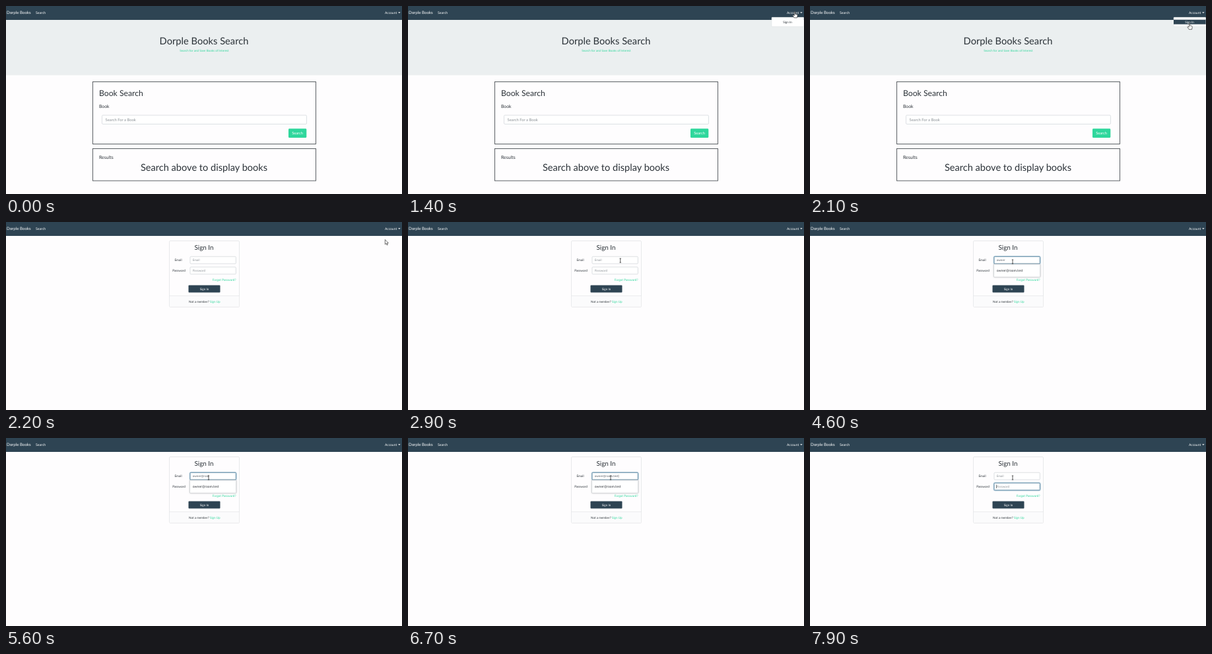
Recreate the animation shown at these times as an HTML page. Size 600 px wide and 284 px high, loop 8000 ms.

```html
<!DOCTYPE html>
<html lang="en">
<head>
<meta charset="utf-8">
<title>Book search sign-in</title>
<style>
  html, body { margin: 0; width: 100%; height: 100%; overflow: hidden; background: #fefdfe; }
  svg { display: block; width: 600px; height: 284px; font-family: Lato, sans-serif; text-rendering: geometricPrecision; }
</style>
</head>
<body>
<svg id="stage" viewBox="0 0 600 284"></svg>
<script>
const stage = document.getElementById('stage');
const LOOP = 8000, STEP = 100;
const NAVY = '#2e4453', GREEN = '#2fd79c', INK = '#2b3238', GREY = '#8b9196';
const BRAND = 'Dorple Books';
const LOGIN = 'owner@room.test';
const SAVED = ['oren.dasil@room.test', '456@456.test', 'owlnight@barn.test',
  'oren.dasil@cloud.test', '456@456', 'demo@room.test'];

// Times at which each key lands
const EMAIL_KEYS = [3600, 3700, 3800, 4000, 4100, 5000, 5400, 5500, 5600, 5800, 6000, 6100, 6300, 6400, 6600];
const PASSWORD_KEYS = [7300, 7400, 7500, 7600, 7700];
const OPEN_MENU = 1400, HOVER_ITEM = 1800, SIGN_IN = 2200;
const FOCUS_EMAIL = 3100, FOCUS_PASSWORD = 6900, SUBMIT = 7900;

const clamp = x => Math.max(0, Math.min(1, x));
const progress = (t, from, to) => clamp((t - from) / (to - from));
const ease = x => x * x * (3 - 2 * x);
const mix = (a, b, k) => a + (b - a) * k;

const rect = (x, y, w, h, fill, stroke = 'none', r = 0, extra = '') =>
  `<rect x="${x}" y="${y}" width="${w}" height="${h}" rx="${r}" fill="${fill}" stroke="${stroke}" ${extra}/>`;
const text = (s, x, y, size, fill = INK, anchor = 'start') =>
  `<text x="${x}" y="${y}" font-size="${size}" fill="${fill}" text-anchor="${anchor}">${s}</text>`;

function navbar() {
  return rect(0, 0, 600, 21, NAVY) +
    text(BRAND, 1, 12.1, 6.15, '#fff') +
    text('Search', 45, 11.9, 5.2, '#fff') +
    text('Account', 574, 11.9, 5, '#fff') +
    '<path d="M594.2 9.2h3.4l-1.7 1.8z" fill="#fff"/>';
}

function home() {
  const card = (y, h) => rect(131.5, y, 338, h, 'none', '#4b5054', 0, 'stroke-width=".9"');
  return rect(0, 21, 600, 83.5, '#ebeff0') +
    text(BRAND + ' Search', 300, 57.5, 14.7, INK, 'middle') +
    text('Search for and Save Books of Interest', 300.5, 68.7, 4.55, GREEN, 'middle') +
    card(114.5, 94) +
    text('Book Search', 141, 135.5, 12.2) +
    text('Book', 141, 153.7, 6.8) +
    rect(145.5, 165, 310, 13.4, '#fff', '#ced4d8', 1.4, 'stroke-width=".7"') +
    text('Search For a Book', 150.5, 173.7, 5.85, GREY) +
    rect(428, 185.3, 27.3, 13.8, GREEN, 'none', 1.4) +
    text('Search', 441.6, 194.2, 5.7, '#fff', 'middle') +
    card(215.5, 48.5) +
    text('Results', 141, 231, 6.9) +
    text('Search above to display books', 300, 249, 14.6, INK, 'middle');
}

function accountMenu(t) {
  if (t < OPEN_MENU) return '';
  const hover = t >= HOVER_ITEM;
  return rect(551, 17, 48.7, 14, '#fff', '#d5dadc', .8, 'stroke-width=".4"') +
    (hover ? rect(551, 20.7, 48.7, 6.9, NAVY) : '') +
    text('Sign In', 575, 25.8, 4.6, hover ? '#fff' : INK, 'middle');
}

function field(y, hint, value, focus, caret) {
  const glow = focus ? rect(278.6, y - .3, 70.2, 11.5, 'none', '#9dbdd0', 1.6, `stroke-width="2" opacity="${focus * .6}"`) : '';
  const box = rect(279, y, 69.4, 10.8, '#fff', focus ? '#4f7f9c' : '#ced3d7', 1.3, `stroke-width="${mix(.7, .9, focus)}"`);
  const cursor = caret ? `<tspan fill="#222" dx="-.3">|</tspan>` : '';
  const body = value
    ? text(value + cursor, 282.7, y + 6.9, 4.6, '#596068')
    : text(hint, 282.7, y + 6.9, 4.6, GREY) + (caret ? rect(282.4, y + 2.6, .6, 5.4, '#333') : '');
  return glow + box + body;
}

function suggestions(items) {
  const rowHeight = 13.7;
  return rect(278.4, 63.8, 70.4, 19.4 + (items.length - 1) * rowHeight, '#fff', '#c3c7ca', .8,
      'stroke-width=".7" style="filter:drop-shadow(0 .6px .8px #0003)"') +
    items.map((s, i) => text(s, 282.7, 75.1 + i * rowHeight, 5.1, '#30343a')).join('');
}

function signIn(t) {
  const typed = keys => keys.filter(k => k <= t).length;
  const submitted = t >= SUBMIT;
  const email = submitted ? '' : LOGIN.slice(0, typed(EMAIL_KEYS));
  const password = submitted ? '' : '•'.repeat(typed(PASSWORD_KEYS));
  const onPassword = t >= FOCUS_PASSWORD;
  const onEmail = t >= FOCUS_EMAIL && !onPassword;

  // The caret restarts its blink at every key and focus change
  const lastInput = Math.max(...[FOCUS_EMAIL, FOCUS_PASSWORD, SUBMIT, ...EMAIL_KEYS, ...PASSWORD_KEYS].filter(k => k <= t));
  const caret = t >= FOCUS_EMAIL && t - lastInput < 500;
  const emailFocus = onEmail ? progress(t, FOCUS_EMAIL - 100, FOCUS_EMAIL + 200) : 0;
  const passwordFocus = onPassword ? progress(t, FOCUS_PASSWORD - 100, FOCUS_PASSWORD + 200) : 0;

  return rect(247.5, 28.5, 106, 100, '#fefdfe', '#dfe0e3', 1.4, 'stroke-width=".7"') +
    rect(247.9, 111.2, 105.2, 16.9, '#fbfbfc') +
    rect(247.5, 111, 106, .6, '#e2e3e6') +
    text('Sign In', 300, 42.4, 9.9, INK, 'middle') +
    text('Email', 261, 59, 4.7, INK, 'middle') +
    text('Password', 262, 74.8, 4.7, INK, 'middle') +
    field(52.2, 'Email', email, emailFocus, onEmail && caret) +
    field(68, 'Password', password, passwordFocus, onPassword && caret) +
    text('Forgot Password?', 348.5, 88.8, 4.6, GREEN, 'end') +
    rect(276.5, 95.5, 48, 11, NAVY, 'none', 1) +
    text('Sign In', 300.5, 102.5, 4.6, '#fff', 'middle') +
    text('Not a member?', 277, 121.6, 4.55) +
    text('Sign Up', 309, 121.6, 4.6, GREEN) +
    (onEmail ? suggestions(email ? [LOGIN] : SAVED) : '');
}

const POINTERS = {
  arrow: '<path d="M0 0V7.2L1.7 5.7 2.9 8.3 4 7.8 2.9 5.3H5.1Z" fill="#fff" stroke="#333" stroke-width=".7"/>',
  hand: '<path d="M-.7 0Q0-.9.7 0V3.2L3.6 3.8Q4.3 4 4.2 5L3.6 8.8H-.8L-3.2 5.2Q-2.8 4-.7 5.4Z" fill="#fff" stroke="#333" stroke-width=".7"/>',
  beam: '<path d="M-1.2-3H1.2M0-3V3M-1.2 3H1.2" fill="none" stroke="#333" stroke-width=".8"/>'
};

function pointer(t) {
  if (t < 700) return '';
  const path = [[700, 452, 238], [1200, 586, 9], [1400, 586, 9], [2100, 575, 26.5], [2300, 573.7, 26.7], [3000, 307, 60]];
  let i = path.findIndex(p => p[0] > t);
  if (i < 0) i = path.length - 1;
  const [t0, x0, y0] = path[i - 1], [t1, x1, y1] = path[i];
  const k = ease(progress(t, t0, t1));
  const x = mix(x0, x1, k), y = mix(y0, y1, k);
  const shape = t >= SIGN_IN ? (x < 348 && y > 52 ? 'beam' : 'arrow') : t >= 1200 ? 'hand' : 'arrow';
  return `<g transform="translate(${x} ${y})">${POINTERS[shape]}</g>`;
}

let shown = -1;
function tick() {
  // The screen is refreshed ten times a second
  const t = Math.floor(performance.now() % LOOP / STEP) * STEP;
  if (t !== shown) {
    shown = t;
    stage.innerHTML = navbar() + (t < SIGN_IN ? home() + accountMenu(t) : signIn(t)) + pointer(t);
  }
  requestAnimationFrame(tick);
}
tick();
</script>
</body>
</html>
```
